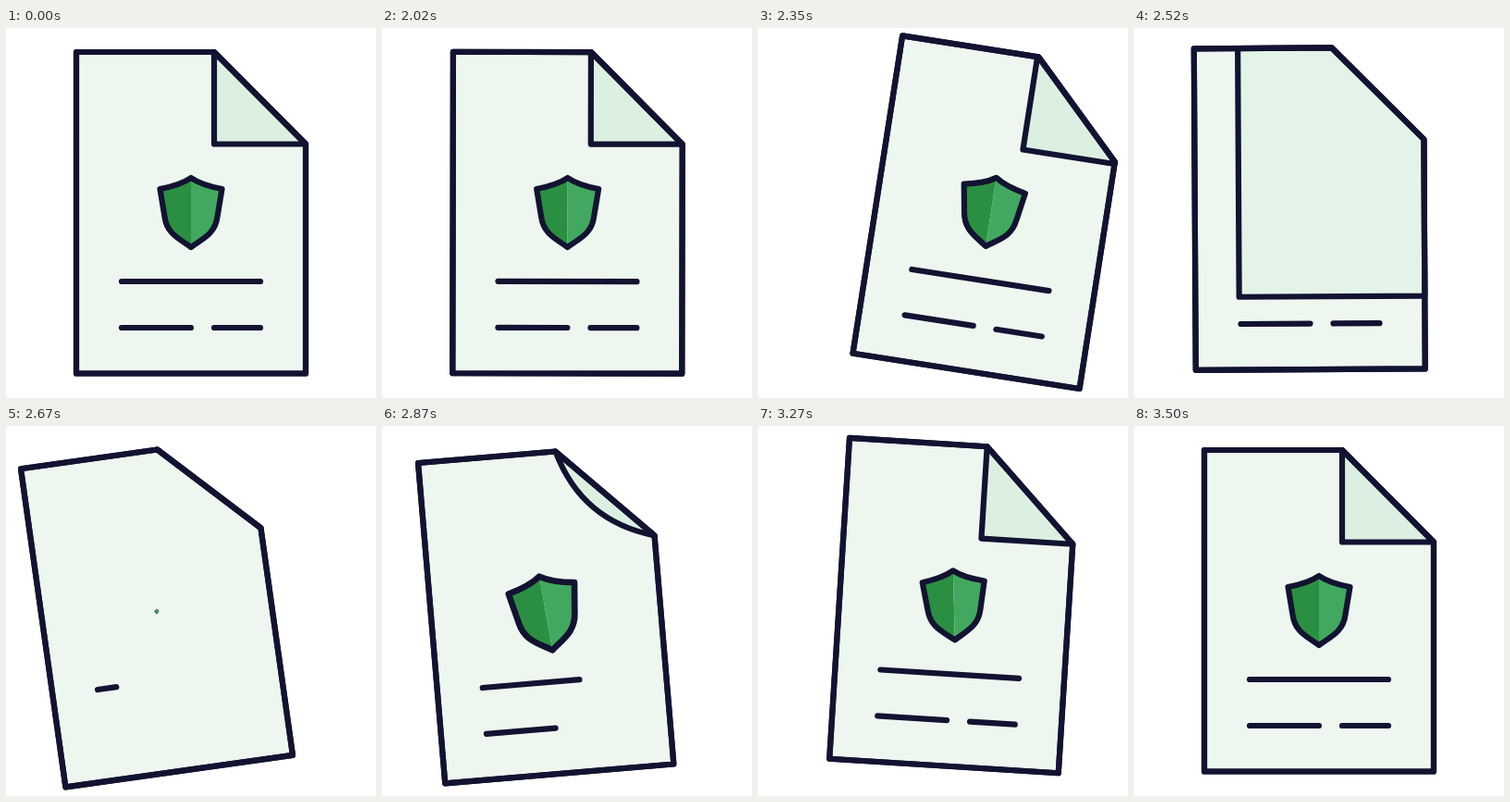
These frames come from a looping animation (400 px wide and 400 px high, 3520 ms). An HTML page:

```html
<!DOCTYPE html>
<html>
<head>
<meta charset="utf-8">
<style>
  html, body { margin: 0; width: 100%; height: 100%; overflow: hidden; background: #fff; }
  svg { display: block; width: 100vw; height: 100vh; }
</style>
</head>
<body>
<svg viewBox="0 0 400 400" fill="none" stroke="#121331" stroke-width="6.2" stroke-linecap="round" stroke-linejoin="round">
  <g id="doc">
    <path fill="#edf7f0" d="M76 26H225L324 125.5V373.5H76Z"/>
    <g id="shield">
      <path fill="#2b8f41" stroke="none" d="M200 162C190 169 177 172 166.5 174L171.5 204C174 223 188 228 200 237Z"/>
      <path fill="#42a85f" stroke="none" d="M200 162C210 169 223 172 233.5 174L228.5 204C226 223 212 228 200 237Z"/>
      <path d="M200 162C190 169 177 172 166.5 174L171.5 204C174 223 188 228 200 237C212 228 226 223 228.5 204L233.5 174C223 172 210 169 200 162Z"/>
    </g>
    <path id="lines"/>
    <path id="flap"/>
    <path d="M76 26H225L324 125.5V373.5H76Z"/>
  </g>
</svg>
<script>
const LOOP = 3520, HOLD = 2000, COVERED = 633;
const [doc, shield, lines, flap] = ['doc', 'shield', 'lines', 'flap'].map(id => document.getElementById(id));

// Keys are [time, value, skew of the ease leading to it]
const tilt = [[0, 0], [333, 8.95], [667, -8, 1.1], [1167, 4.75, 1.25], [1490, 0]];
const shiftX = [[0, 0], [333, 54.7], [667, -37, .77], [1167, 15.7, 1.2], [1490, 0]];
const shiftY = [[0, 0], [333, -.5], [520, -4.4], [690, 1.5], [870, 3], [1167, -7.5], [1490, 0]];
const shieldTurn = [[760, 0], [1040, -15], [1420, 0]];
const shieldSize = [[640, 0], [850, 1.08], [1150, 1]];

const clamp = v => Math.min(1, Math.max(0, v));
const mix = (a, b, k) => a + (b - a) * k;
const mixPoint = (a, b, k) => [mix(a[0], b[0], k), mix(a[1], b[1], k)];
const smooth = u => u * u * (3 - 2 * u);
const easeOut = (t, start, span) => 1 - (1 - clamp((t - start) / span)) ** 2.5;

function track(keys, t) {
  if (t <= keys[0][0]) return keys[0][1];
  for (let i = 1; i < keys.length; i++) {
    const [t0, v0] = keys[i - 1], [t1, v1, skew = 1] = keys[i];
    if (t < t1) return mix(v0, v1, smooth(((t - t0) / (t1 - t0)) ** skew));
  }
  return keys[keys.length - 1][1];
}

const segment = (x0, x1, y) => x1 > x0 ? `M${x0} ${y}H${x1}` : '';

function drawLines(first, second) {
  const end = 125 + 150 * second;
  lines.setAttribute('d', segment(125, 125 + 150 * first, 274) +
    segment(125, Math.min(end, 200), 324) + segment(225, end, 324));
}

function growFlap(t) {
  const k = smooth(clamp((t - 335) / 298));
  const x = mix(225, 76, k), y = mix(125.5, 373.5, k), c = k ** 2.5;
  flap.setAttribute('d', `M${x} 26H225L324 125.5V${y}H${x}Z`);
  flap.setAttribute('fill', `rgb(${mix(220, 237, c)},${mix(240, 247, c)},${mix(226, 240, c)})`);
}

function curlFlap(t) {
  const a = [225, 26], b = [324, 125.5];
  const tip = mixPoint([274.5, 75.75], [225, 125.5], easeOut(t, 716, 557));
  const round = 1 - smooth(clamp((t - 875) / 320));
  flap.setAttribute('d', `M${a}L${mixPoint(tip, a, round)}Q${tip} ${mixPoint(tip, b, round)}L${b}Z`);
  flap.setAttribute('fill', '#dcf0e2');
}

function draw(now) {
  const t = now % LOOP - HOLD;
  doc.setAttribute('transform',
    `translate(${track(shiftX, t)} ${track(shiftY, t)}) rotate(${track(tilt, t)} 200 199.75)`);
  if (t < COVERED) {
    shield.setAttribute('transform', '');
    drawLines(1, 1);
    growFlap(t);
  } else {
    const size = track(shieldSize, t);
    shield.setAttribute('visibility', size > .01 ? 'visible' : 'hidden');
    shield.setAttribute('transform',
      `translate(200 199.5) rotate(${track(shieldTurn, t)}) scale(${size}) translate(-200 -199.5)`);
    drawLines(easeOut(t, 636, 614), easeOut(t, 707, 660));
    curlFlap(t);
  }
  if (t < COVERED) shield.setAttribute('visibility', 'visible');
}

const start = performance.now();
function tick() {
  draw(performance.now() - start);
  requestAnimationFrame(tick);
}
tick();
</script>
</body>
</html>
```
